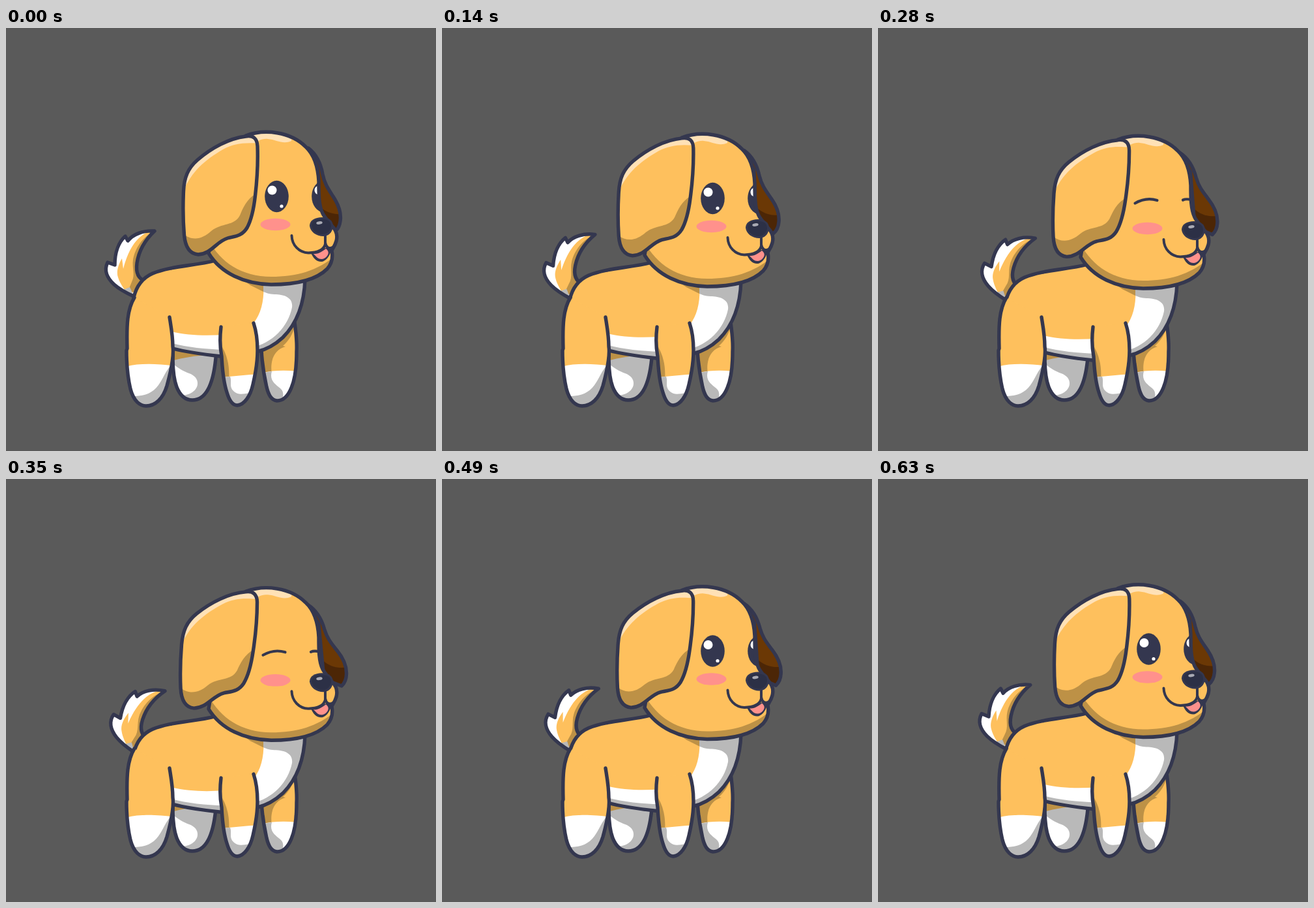
Animation, 660 px wide and 648 px high, one loop 0.7 s. Source, as an HTML page:

```html
<!DOCTYPE html>
<html lang="en">
<head>
<meta charset="utf-8">
<title>Puppy</title>
<style>
  html, body { margin: 0; width: 100%; height: 100%; overflow: hidden; background: #5a5a5a; }
  svg { display: block; width: 660px; height: 648px; }
  .line { fill: none; stroke: #34374f; stroke-width: 5.4; stroke-linecap: round; stroke-linejoin: round; }
</style>
</head>
<body>
<svg id="stage" viewBox="0 0 660 648"></svg>
<script>
const C = {
  fur: '#fec05d', shade: '#bd9146', light: '#ffe1b6', white: '#ffffff', grey: '#b9b9b9',
  ink: '#34374f', nose: '#2c3046', pink: '#ff918c', brown: '#6b3805', dark: '#4c2606'
};

const fill = (color, d) => `<path fill="${color}" d="${d}"/>`;
const line = (d, width = 5.4) => `<path class="line" style="stroke-width:${width}" d="${d}"/>`;
const oval = (color, x, y, rx, ry = rx, extra = '') =>
  `<ellipse fill="${color}" cx="${x}" cy="${y}" rx="${rx}" ry="${ry}" ${extra}/>`;
const group = (name, body) => `<g data-part="${name}">${body}</g>`;

// A filled shape, patches clipped to it, then its outline.
const part = (id, base, d, patches = '') =>
  `<clipPath id="${id}"><path d="${d}"/></clipPath>` + fill(base, d) +
  `<g clip-path="url(#${id})">${patches}</g>` + line(d);

const tail = part('tail', C.white,
  'M228 311C210 310 195 316 187 326L183 319C174 327 167 342 167 363L156 359C150 371 155 383 166 393C175 401 185 406 196 411L214 388C202 384 199 374 201 360C204 340 213 325 228 311Z',
  fill(C.fur, 'M228 309C206 314 190 331 180 369L178 353C172 363 169 374 172 382C175 392 182 400 186 407L220 400V340Z') +
  fill(C.shade, 'M226 312C205 323 197 343 195 355C193 367 199 378 193 389L186 406L220 400V330Z') +
  fill(C.grey, 'M180 401L190 397L198 414Z'));

const farHind = part('farHind', C.grey,
  'M257 480C255 510 256 534 262 550C268 565 277 570 286 570C306 570 318 548 322 505L326 480Z',
  fill(C.white, 'M250 508C260 519 270 525 281 529C298 535 297 551 286 558C278 563 270 564 262 560L250 545Z') +
  fill(C.shade, 'M250 480H330V502C300 499 272 505 254 510Z'));

const farFront = part('farFront', C.fur,
  'M443 450C445 468 447 478 446 496C446 518 444 537 438 551C432 566 424 571 416 571C407 570 403 562 400 550C396 532 393 515 392 492L415 455Z',
  fill(C.shade, 'M385 455H444C440 470 434 479 425 487L429 488C411 493 405 510 408 530H385Z') +
  fill(C.white, 'M390 529C410 524 428 524 450 526V580H390Z') +
  fill(C.grey, 'M390 529L408 526C404 540 413 545 421 552C428 558 425 566 423 575H390Z'));

const torso = part('torso', C.fur,
  'M196 413C200 396 209 383 225 376C254 364 288 365 322 356L400 340L459 384C458 420 447 452 425 474C411 487 398 493 385 496L330 503C303 500 279 497 256 491L205 480Z',
  fill(C.white, 'M240 461C270 471 300 472 335 470V510H240Z') +
  fill(C.grey, 'M240 479C270 488 300 492 335 493V510H240Z') +
  fill(C.white, 'M395 380C397 412 394 434 380 452V505H470V380Z') +
  fill(C.grey, 'M390 380H470V510H375V490C410 483 433 457 439 428C441 413 427 408 412 408C404 408 398 405 395 404Z') +
  fill(C.shade, 'M340 370L375 394L395 404V385Z'));

const hind = part('hind', C.fur,
  'M197 413C186 431 185 455 186 491L185 494C185 516 187 536 191 553C196 572 206 579 215 579C229 579 241 568 247 548C253 526 258 502 256 488C256 471 253 456 251 443',
  fill(C.white, 'M180 520C200 513 232 514 262 518V590H180Z') +
  fill(C.grey, 'M180 562C206 567 223 562 234 547C240 539 245 526 252 518L270 520V590H180Z'));

const front = part('front', C.fur,
  'M330 458C328 475 328 488 331 503C332 523 334 543 339 558C343 572 349 578 355 578C366 577 375 564 379 546C383 529 386 509 386 494C386 477 384 464 380 452',
  fill(C.shade, 'M325 478C338 496 344 514 342 540H325Z') +
  fill(C.white, 'M325 536C348 533 368 532 390 530V590H325Z') +
  fill(C.grey, 'M325 536L344 534C347 542 342 549 349 556C357 564 366 559 376 560V590H325Z'));

const farEar = part('farEar', C.brown,
  'M464 184C477 194 483 207 486 224C489 239 495 247 502 258C510 270 515 283 513 296C512 304 509 309 504 313L478 300V215Z',
  fill(C.dark, 'M475 267C486 280 498 287 520 285V320H475Z'));

const face = part('face', C.fur,
  'M368 165C397 154 437 159 460 182C475 196 479 216 480 235C480 254 480 272 486 284C490 292 497 298 501 304C507 310 509 318 507 326C505 334 501 338 500 341C502 351 500 361 493 369C476 386 446 393 407 393C366 392 330 376 311 345L330 230Z',
  fill(C.light, 'M370 150H440L438 173C425 179 415 171 402 170C392 169 386 174 378 178Z') +
  fill(C.shade, 'M311 325C329 359 362 381 407 381C446 381 478 372 505 349V400H305Z') +
  oval(C.pink, 413.5, 301, 23, 9.3) +
  group('open', eye(415.5) + eye(487.5)) +
  group('shut', line('M394.5 262.5C404 257 415 254 428.5 258', 4.2) + line('M468 257.5C472 255.5 476 256 481 257', 4.2)));

function eye(x) {
  return oval(C.ink, x, 258, 18.3, 24.2) +
    oval(C.white, x - 7, 248.5, 7) +
    oval(C.white, x + 7.5, 273, 2.6);
}

const muzzle =
  fill(C.ink, 'M468 344C476 345 484 342 490 337C495 336 499 338 499 341C497 350 490 358 484 358C476 358 471 352 468 344Z') +
  fill(C.pink, 'M472 346C480 347 487 341 491 338C495 341 496 345 493 349C489 355 482 355 478 352Z') +
  line('M438.5 318C439 333 450 344 464 344.5C478 344 488 340 490 331V318', 4) +
  line('M490 329C491 336 496 339 501 336', 4.2) +
  fill(C.ink, 'M466 303C466 295 474 290 485 290C496 290 502 295 502 304C501 314 494 319 487 319C476 319 467 312 466 303Z') +
  fill(C.nose, 'M469 301C471 294 478 292.5 486 293C495 293 499 297 499 304C498 312 492 316 486 316C476 316 469 309 469 301Z') +
  oval('#a9aab4', 481, 298.5, 4.8, 2.3, 'transform="rotate(-8 481 298.5)"');

const nearEar = part('nearEar', C.fur,
  'M368 166C379 164 385.5 169 386 181C387 209 385 236 382.5 257C380 280 376 295 370 306C362 319 352 319 340 322C323 327 315 346 295 347C281 346 275 334 273.5 317C271.5 293 271.5 272 272.5 250C273.5 229 279 215 294 202C315 184 342 169 368 166Z',
  fill(C.light, 'M270 256C282 222 304 203 333 186C350 177 365 175 390 177V150H270Z') +
  fill(C.shade, 'M268 312C284 328 301 324 315 311C331 298 350 304 359 287C364 275 371 258 390 251V360H268Z'));

document.getElementById('stage').innerHTML =
  '<rect width="660" height="648" fill="#5a5a5a"/>' +
  group('tail', tail) + farHind + farFront + group('torso', torso) + hind + front +
  group('head', group('farEar', farEar) + face + muzzle + group('nearEar', nearEar));

const parts = {};
document.querySelectorAll('[data-part]').forEach(el => parts[el.dataset.part] = el);
const set = (name, transform) => parts[name].setAttribute('transform', transform);

const STEP = 70;
const DROP = [0, 1.5, 3, 4.5, 6, 7.3, 7, 5.5, 4, 2.5];

function draw(now) {
  const step = Math.floor(now / STEP) % DROP.length;
  const drop = DROP[step];
  const shut = step >= 3 && step <= 5;
  set('torso', `translate(0 ${drop})`);
  set('head', `translate(0 ${drop})`);
  set('tail', `rotate(${drop * 1.25} 150 418)`);
  set('nearEar', `rotate(${drop * 0.29} 378 168)`);
  set('farEar', `rotate(${drop * -0.75} 476 195)`);
  parts.open.style.display = shut ? 'none' : '';
  parts.shut.style.display = shut ? '' : 'none';
}

const start = performance.now();
function tick() {
  draw(performance.now() - start);
  requestAnimationFrame(tick);
}
tick();
</script>
</body>
</html>
```
